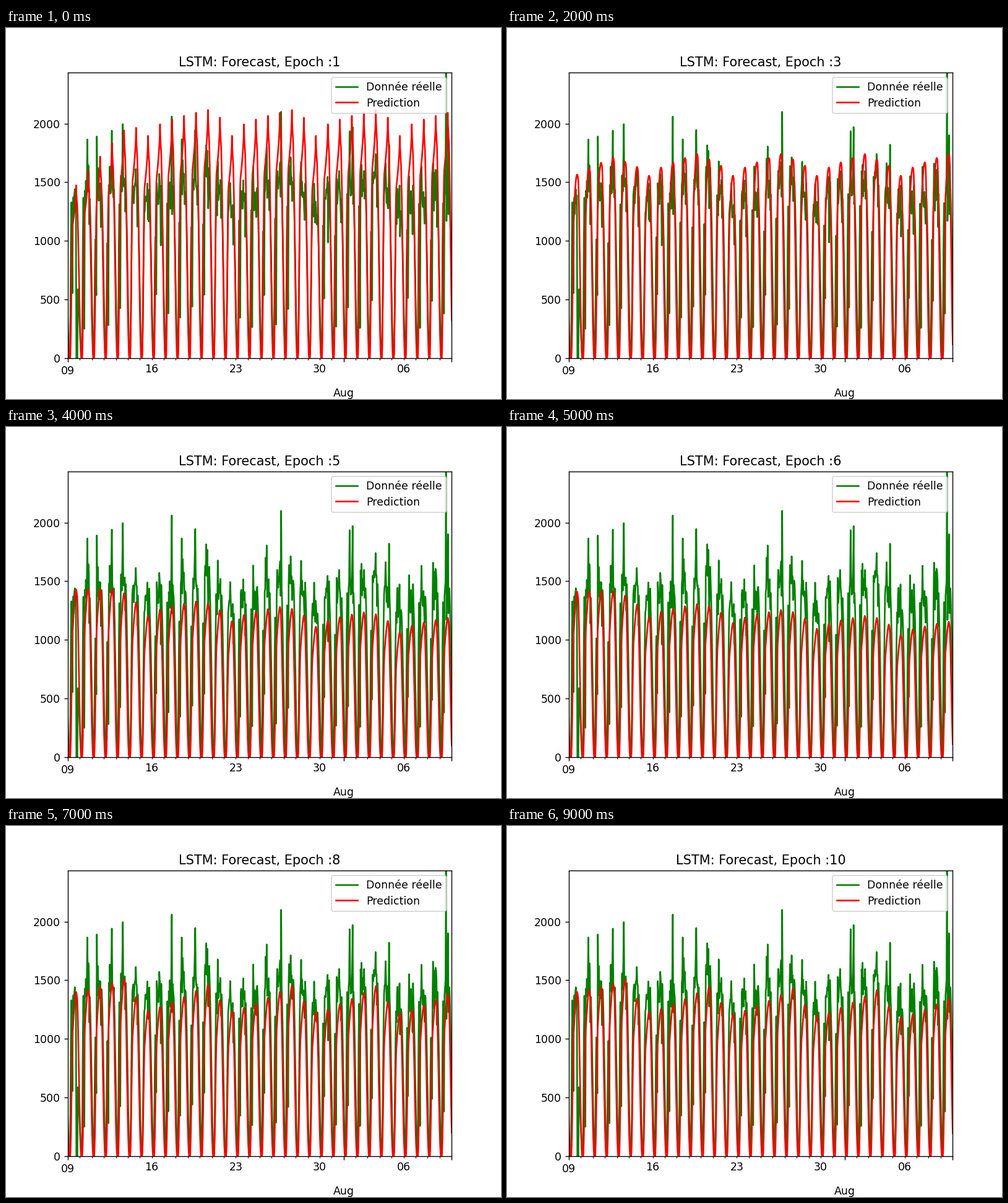
Animation of 800x600 px, one loop 10 s. Source, as a matplotlib script:

```python
import numpy as np
import matplotlib.pyplot as plt
from matplotlib.animation import FuncAnimation

DAYS = 32
rng = np.random.default_rng(9)

# epoch: low of week 1, change per week, weekly rise, strongest day, bend of the week,
#        first-day offset, roundness of the daily top, evening lead in hours
EPOCHS = {
    1: (1895, 0, 220, 5, 0.5, -520, 0.6, 0),
    2: (1330, -55, 190, 5, 1.5, 50, 1.1, 0),
    3: (1555, 0, 185, 4, 0.7, -60, 2, 0.8),
    4: (1215, -42, 170, 4.5, 0.6, 130, 1.5, 0.8),
    6: (1195, -50, 150, 4.5, 0.7, 120, 1.5, 0.5),
    8: (1245, -8, 225, 5, 1.3, 120, 1.5, 0),
    10: (1230, -15, 225, 5, 1.3, 130, 1.5, 0),
}

# The most striking readings: (time in days, value)
SPIKES = [(1.63, 1865), (2.43, 1890), (3.67, 1940), (4.59, 1995), (8.67, 2060), (9.52, 1865),
          (10.63, 1945), (11.56, 1815), (16.57, 1805), (17.8, 2100), (23.48, 1935),
          (23.74, 1970), (26.8, 1820), (31.54, 2460), (31.59, 1170), (31.7, 1900)]


def smooth(start, end, x):
    u = np.clip((x - start) / (end - start), 0, 1)
    return u * u * (3 - 2 * u)


def week_wave(day, top, bend):
    """0 on the weakest day of the week, 1 on the strongest."""
    return np.interp((day - 6) % 7, [0, top, 7], [0, 1, 0]) ** bend


def measured_day(day, hour):
    level = 1270 + 260 * week_wave(day, 5, 0.7)
    load = level * smooth(4.5, 9.5, hour) * smooth(27.8, 19, hour)
    plateau = (hour >= 10) & (hour <= 19)
    load[plateau] = level + rng.normal(0, 75, plateau.sum())
    load[hour == rng.integers(11, 19)] = level + rng.uniform(120, 250)
    load[hour == rng.integers(17, 20)] = level - rng.uniform(100, 400)
    step, dip = rng.uniform(980, 1400), rng.uniform(220, 560)
    if (day - 6) % 7 not in (0, 6):
        early = hour <= 7
        load[early] = step * smooth(4, 7, hour[early])
        load[hour == 8] = (step + dip) / 2
        load[hour == 9] = dip
    return load


def measured():
    hour = np.arange(4, 28)
    t = np.concatenate([24 * d + hour for d in range(DAYS)])
    load = np.concatenate([measured_day(d, hour) for d in range(DAYS)])
    for x, value in SPIKES:
        load[t == round(24 * x)] = value
    # outage on the first evening
    load[(t > 16) & (t < 20)] = 0
    load[(t >= 20) & (t < 28)] *= 0.45
    return t / 24, load


def forecast(epoch):
    columns = np.array(list(EPOCHS.values())).T
    low, drift, rise, top, bend, first, power, lead = (
        np.interp(epoch, list(EPOCHS), c) for c in columns)
    day = np.arange(-1, DAYS)[:, None]
    hour = np.arange(3.5, 27.5, 0.5)
    peak = low + drift * (day - 6) / 7 + rise * week_wave(day, top, bend)
    peak = peak + first * np.clip(1 - day / 6, 0, 1)
    tip = 1 - 0.22 * (abs(hour - 16.5) / 6.4) ** power
    shift = lead * np.clip(day / 12, 0, 1)
    shape = tip * smooth(4.5, 9.5, hour) * smooth(27 - shift, 18.5 - shift, hour)
    return (day + hour / 24).ravel(), (peak * shape).ravel()


fig, ax = plt.subplots(figsize=(6.4, 4.8), dpi=125)
ax.plot(*measured(), color="green", label="Donnée réelle")
pred, = ax.plot([], [], color="red", label="Prediction")
ax.set_xlim(0, DAYS)
ax.set_ylim(0, 2435)
ax.set_yticks(range(0, 2001, 500))
ax.set_xticks([0, 23, 32], ["09", "", ""])
weeks = {7: "16", 14: "23", 21: "30", 28: "06"}
minor = [d for d in range(1, DAYS) if d != 23]
ax.set_xticks(minor, [weeks.get(d, "") for d in minor], minor=True)
fig.text(545.6 / 800, 4.5 / 600, "Aug", ha="center", va="baseline")
ax.legend(loc="upper right", labelspacing=0.43, borderaxespad=0.47, handletextpad=0.84)
title = ax.set_title("")


def draw(i):
    pred.set_data(*forecast(i + 1))
    title.set_text(f"LSTM: Forecast, Epoch :{i + 1}")
    return pred, title


anim = FuncAnimation(fig, draw, frames=10, interval=1000, repeat=True, repeat_delay=0)
plt.show()
```
